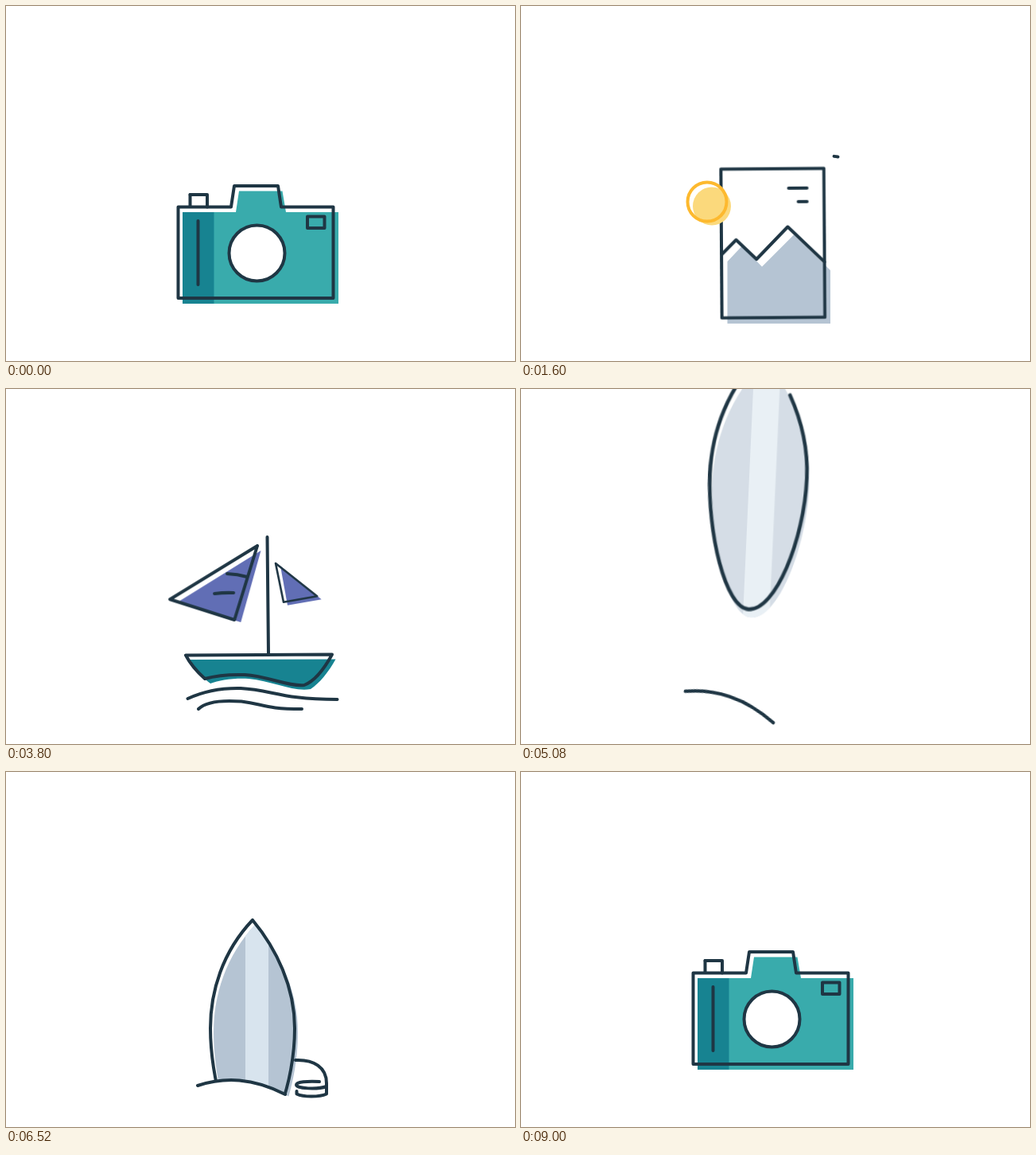
Write an HTML page that moves like this. It is 640 px wide and 446 px high and loops after 9040 ms.

```html
<!DOCTYPE html>
<html lang="en">
<head>
<meta charset="utf-8">
<title>Holiday icons</title>
<style>
  html, body { margin: 0; width: 100%; height: 100%; overflow: hidden; background: #fff; }
  svg { display: block; width: 100%; height: 100%; }
</style>
</head>
<body>
<svg id="stage" viewBox="0 0 640 446"></svg>
<script>
const LOOP = 9040;
const EASE = 'cubic-bezier(.25,.7,.3,1)';
const IN = 'cubic-bezier(.5,0,.9,.6)';
const INK = '#1f3644', TEAL = '#39abac', DEEP = '#178391', SLATE = '#b5c4d3',
      PALE = '#d8e4ee', VIOLET = '#616eb5', SUN = '#fbd97c', GOLD = '#fdb92e';
const BASE = { x: 0, y: 0, r: 0, s: 1, sx: 1, sy: 1, o: 1 };
const stage = document.getElementById('stage');

function make(parent, tag, attrs = {}) {
  const el = document.createElementNS('http://www.w3.org/2000/svg', tag);
  for (const k in attrs) el.setAttribute(k, attrs[k]);
  return parent.appendChild(el);
}

function frame({ t, e, x, y, r, s, sx, sy, o, a, b, w, c }) {
  const f = {
    offset: t / LOOP,
    easing: e || EASE,
    opacity: o,
    transform: `translate(${x}px,${y}px) rotate(${r}deg) scale(${s * sx},${s * sy})`
  };
  if (b !== undefined) {
    f.strokeDasharray = `${Math.max(0, b - a)} 300`;
    f.strokeDashoffset = `${-a}`;
  }
  if (w !== undefined) f.strokeWidth = `${w}px`;
  if (c !== undefined) f.stroke = c;
  return f;
}

// Rows are [ms, changed values, easing]; other values carry over.
function anim(el, rows, origin = [320, 310]) {
  let now = { ...BASE };
  const steps = rows.map(([t, p, e]) => {
    now = { ...now, ...p };
    return { ...now, t, e };
  });
  steps.unshift({ ...now, t: 0, e: 'linear' });
  steps.push({ ...now, t: LOOP });
  el.style.transformOrigin = `${origin[0]}px ${origin[1]}px`;
  el.animate(steps.map(frame), { duration: LOOP, iterations: Infinity });
  return el;
}

// Stroke grows from t0 to t1 and is eaten away from t2 to t3.
function draw(t0, t1, t2, t3, mid = []) {
  const grow = [[t0, { o: 0, a: 0, b: 0 }], [t0, { o: 1 }, mid.length ? 'linear' : EASE],
                ...mid, [t1, { b: 100 }]];
  const eat = [[t2, { o: 1, a: 0, b: 100 }, IN], [t3, { a: 100 }], [t3, { o: 0 }]];
  return t2 < t0 ? [...eat, ...grow] : [...grow, ...eat];
}

const group = (parent, rows, origin) => {
  const g = make(parent, 'g');
  return rows ? anim(g, rows, origin) : g;
};
const line = (parent, d, rows, opt = {}) => {
  const el = make(parent, 'path', {
    d, fill: 'none', stroke: opt.color || INK, 'stroke-width': opt.width || 4,
    'stroke-linecap': 'round', 'stroke-linejoin': 'round', pathLength: 100
  });
  return rows ? anim(el, rows, opt.origin) : el;
};
const shape = (parent, d, fill, rows, origin) => {
  const el = make(parent, 'path', { d, fill });
  return rows ? anim(el, rows, origin) : el;
};
const disc = (x, y, r) => `M${x - r},${y}a${r},${r} 0 0 0 ${2 * r},0a${r},${r} 0 0 0 ${-2 * r},0Z`;

function camera() {
  const g = group(stage), lens = [315.5, 310.5];
  const body = group(g, [
    [40, {}, IN], [200, { sx: 1.05, sy: .95 }, IN], [520, { sx: .4, sy: .08 }], [520, { o: 0 }],
    [7320, { sx: 1.3, sy: .3, r: -4, x: 4 }], [7320, { o: 1 }, 'linear'],
    [7600, { sx: 1.16, sy: .97, r: -1.4, x: 3 }], [8240, { sx: 1, sy: 1, r: 0, x: 0 }]
  ], [222, 374]);
  shape(body, 'M222,259H289L293,232.5H347.5L352,259H418V374H222Z', TEAL);
  shape(body, 'M222,259H261.5V374H222Z', DEEP, [
    [40, {}], [7320, { sx: .6 }, 'linear'], [7600, { sx: 1.2 }], [8160, { sx: 1 }]
  ], [222, 374]);
  shape(g, disc(...lens, 35), '#fff', [
    [40, {}, IN], [400, { s: 0 }], [400, { o: 0 }],
    [7340, { s: .2 }], [7340, { o: 1 }, 'linear'], [7600, { s: 1.13 }], [8160, { s: 1 }]
  ], lens);

  const ink = group(g, [
    [40, {}], [520, { r: 3 }], [7340, { r: -6, s: .9 }, 'linear'],
    [7600, { r: -1.5, s: .97 }], [8300, { r: 0, s: 1 }]
  ], [314, 310]);
  line(ink, 'M231.5,237V252.5H216.5V367H411.5V252.5H346L342,226H287L283,252.5H231.5',
    draw(7380, 8200, 40, 640, [[7600, { b: 60 }]]));
  line(ink, 'M231.5,237H253V252.5', draw(7800, 8200, 40, 360));
  line(ink, 'M241.5,350V270', draw(7540, 8000, 80, 440, [[7600, { b: 20 }]]));
  line(ink, 'M379,264.5H400.5V279H379Z', draw(7760, 8360, 40, 400));
  line(g, disc(...lens, 35), [
    [40, { a: 0, b: 100, w: 4, c: INK }, IN], [560, { a: 100 }], [560, { o: 0 }],
    [7400, { a: 0, b: 4, w: 1.1, c: DEEP, s: 3.6, x: -3, y: -6 }], [7400, { o: 1 }, 'linear'],
    [7600, { a: 1.4, b: 21.6, w: 1.2, s: 3, x: -2.5, y: -5 }, 'ease-in-out'],
    [8200, { a: 0, b: 100, w: 4, c: INK, s: 1, x: 0, y: 0 }]
  ], { origin: lens });
}

function picture() {
  const g = group(stage), mid = [317, 298];
  const hills = 'M252,312L270.5,293.5L296,318L335.5,277.5L381.5,322';
  shape(g, 'M259.5,321L278,301.5L303,327.5L343,287.5L389,332V399H259.5Z', SLATE, [
    [560, { o: 0, sy: .1, sx: .7 }], [560, { o: 1 }], [1200, { sy: 1.06, sx: 1 }], [1560, { sy: 1 }],
    [2440, {}, IN], [2800, { sy: .05 }], [2800, { o: 0 }]
  ], [324, 399]);
  const ink = group(g, [
    [400, { r: -14, s: 1.12, x: 14 }], [1200, { r: -1.2, s: 1.01, x: 0 }],
    [1600, { r: -.4, s: 1 }], [2200, { r: 0 }], [2440, {}], [2960, { r: 4, y: 6 }]
  ], mid);
  line(ink, 'M252,391.5V204.5H381.5V391.5Z', draw(400, 1240, 2440, 2920));
  line(ink, hills, draw(720, 1360, 2440, 2800));
  line(ink, 'M360,229H337', draw(1280, 1600, 2440, 2640));
  line(ink, 'M360,246H349', draw(1360, 1600, 2440, 2600));
  line(g, 'M362,182C375,185 388,188.5 398.5,189.5', [
    [1160, { o: 0, a: 0, b: 0 }], [1160, { o: 1 }], [1400, { b: 100, a: 30 }, 'linear'],
    [1600, { a: 86 }], [1680, { a: 100 }], [1680, { o: 0 }]
  ]);
  const sun = group(g, [
    [880, { o: 0, s: .1, x: 44, y: 20 }], [880, { o: 1 }], [1360, { s: 1.03, x: 0, y: 0 }],
    [1600, { s: 1 }], [2440, {}, IN], [2800, { s: .1, x: -20, y: 30 }], [2800, { o: 0 }]
  ], [234, 246]);
  shape(sun, disc(240, 251.5, 24), SUN);
  line(sun, disc(234, 246, 24.5), draw(880, 1440, 2440, 2760), { color: GOLD });
}

function boat() {
  const g = group(stage);
  shape(g, 'M231,340L414.5,339.5C406,355 394,370 383,377C362,381 335,367 305,364C285,363 268,366 257,370C247,362 237,352 231,340Z',
    DEEP, [
      [2760, { o: 0, sx: .3, sy: .15, y: 20 }], [2760, { o: 1 }], [3400, { sx: 1, sy: 1.04, y: 0 }],
      [3760, { sy: 1 }], [4320, {}, IN], [4640, { sx: .4, sy: .05, y: 24 }], [4640, { o: 0 }]
    ], [320, 358]);
  line(g, 'M226,334.5L410,333.5C401,350 388,367 375,372C355,374 330,361 300,359C283,358.500 264,360 250,364C240,355 232,346 226,334.5Z',
    draw(2800, 3560, 4320, 4720));
  line(g, 'M330,333L328.5,186', draw(3120, 3560, 4320, 4600));
  const sea = group(g, [
    [2720, { x: -30 }], [3800, { x: 0 }, 'ease-in-out'], [4280, { x: 1 }, IN], [4720, { x: -12 }]
  ]);
  line(sea, 'M228.5,389C250,379 272,375.500 295,376C335,378 345,390 416.5,390', draw(2720, 3640, 4320, 4720));
  line(sea, 'M242,402C253,391 276,391 296,392.500C325,396 325,402 372,402', draw(2840, 3720, 4320, 4760));

  const main = group(g, [
    [3360, { o: 0, s: .25, r: 26, x: -4, y: 50 }], [3360, { o: 1 }],
    [3800, { s: 1, r: 0, x: 0, y: 0 }], [4120, { r: -17, x: 2 }],
    [4320, {}, IN], [4600, { s: .1, y: 40 }], [4600, { o: 0 }]
  ], [316, 197]);
  shape(main, 'M320.5,203L295,293L215,268Z', VIOLET);
  line(main, 'M316,197L206,264L287,290Z', draw(3360, 3720, 4320, 4600));
  line(main, 'M303,236Q291,232.5 278,232', draw(3600, 3800, 4320, 4480));
  line(main, 'M286,256Q274,255.5 262,257', draw(3640, 3800, 4320, 4480));

  const jib = group(g, [
    [3520, { o: 0, s: .15, r: -36, y: 24 }], [3520, { o: 1 }, 'linear'],
    [3800, { s: 1, r: 0, y: 0 }], [4120, { s: 1.5, r: 10.5 }],
    [4320, {}, IN], [4600, { s: .1, y: 40 }], [4600, { o: 0 }]
  ], [339, 219]);
  shape(jib, 'M345,222.5L396.5,264L354,271.5Z', VIOLET);
  line(jib, 'M339,219L391,260L349,267.5Z', null, { width: 2.6 });
}

function surf() {
  const outline = 'M310,186C272,226 257,276 257,322C257,385 280,468 306,468C335,468 363,390 363,322C363,270 340,222 310,186Z';
  const defs = make(stage, 'defs');
  const clip = (id, d) => make(make(defs, 'clipPath', { id }), 'path', { d });
  clip('sea', 'M0,-60H640V408H356L351,405C310,384 275,383 241,394H0Z');
  clip('deck', outline);

  const g = group(stage);
  g.setAttribute('clip-path', 'url(#sea)');
  const board = group(g, [
    [4720, { o: 0, x: -22, y: -470, r: 6, s: 1.3 }], [4720, { o: 1 }, 'linear'],
    [5080, { x: -11.5, y: -213, r: 2.6, s: 1.15 }, 'cubic-bezier(.4,.2,.3,1)'],
    [5720, { x: 0, y: 8, r: -.6, s: 1 }, 'ease-in-out'], [6120, { y: 0, r: 0 }],
    [7160, {}], [7240, { y: -10 }, IN], [7520, { y: 250 }], [7520, { o: 0 }]
  ], [310, 322]);
  const paint = group(board, [
    [4720, { o: .2, y: 6, x: -2 }, 'linear'], [5080, { o: .57, y: 4, x: -1 }], [5600, { o: 1, y: 0, x: 0 }], [7160, {}]
  ]);
  const deck = make(paint, 'g', { transform: 'translate(4 5)' });
  shape(deck, outline, SLATE);
  shape(deck, 'M297,180H326V475H297Z', PALE).setAttribute('clip-path', 'url(#deck)');
  line(board, outline, [
    [4720, { a: 0, b: 40 }, 'linear'], [5080, { b: 91 }], [5320, { b: 100 }], [7520, {}]
  ]);

  const water = group(stage, [
    [4680, { x: -60, r: 22, s: 1.1 }], [5080, { x: -34, r: 14, s: 1.06 }, 'ease-in-out'],
    [5720, { x: 2, r: -2, s: 1 }, 'ease-in-out'], [6160, { x: 0, r: 0 }],
    [7160, {}, IN], [7480, { x: -40, r: -16 }]
  ], [296, 399.5]);
  line(water, 'M351,405C310,384 275,383 241,394', draw(4680, 5040, 7160, 7480));
  line(stage, 'M364,362C387,361 403,371 403,391V404.5C394,408.5 374,408.5 365.500,404.5V401',
    draw(5640, 6360, 7160, 7440));
  line(stage, 'M403,395C392,399 365,398 365,393C365,389.5 379,388 394,389', draw(5960, 6480, 7160, 7400));

  const streak = (d, a, b) => line(stage, d, [
    [7360, { o: 0, a: 0, b: 0 }], [7360, { o: 1 }, 'linear'],
    [7600, { a, b }, 'linear'], [7720, { a: 100, b: 100 }], [7720, { o: 0 }]
  ]);
  streak('M235,341L191.500,367', 87, 100);
  streak('M259,346L219,371', 60, 100);
}

picture();
boat();
surf();
camera();
</script>
</body>
</html>
```
